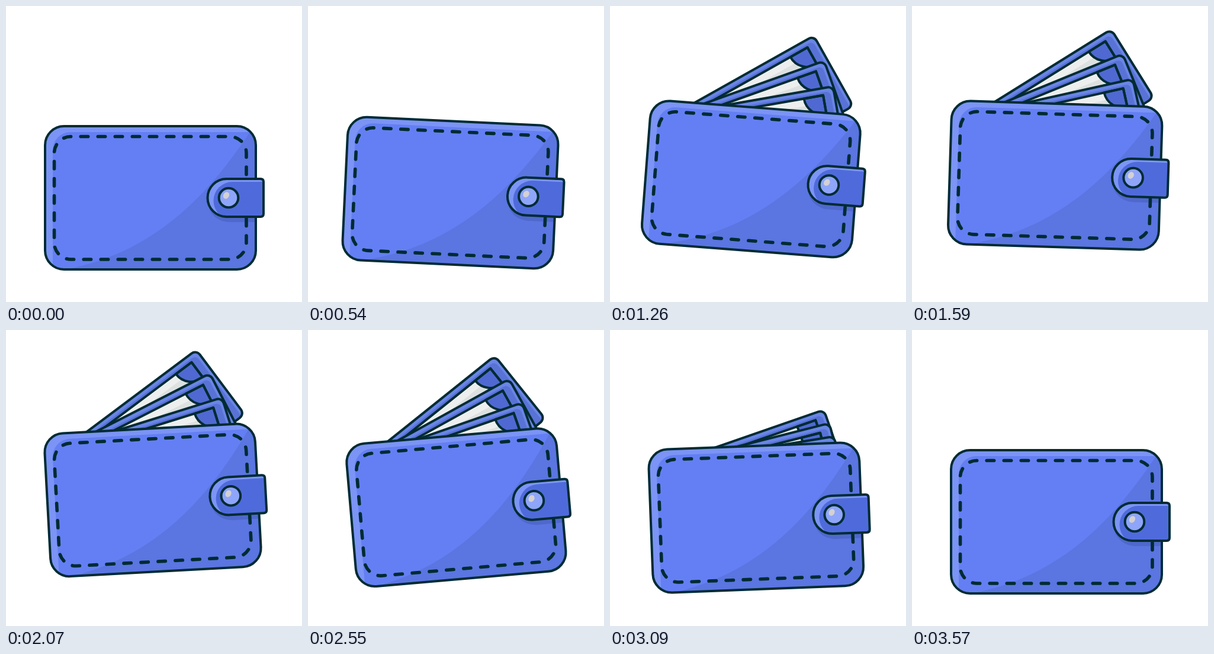
An HTML page that plays this animation: 500 by 500 pixels, repeating every 3600 ms.

```html
<!DOCTYPE html>
<html lang="en">
<head>
<meta charset="utf-8">
<title>Wallet</title>
<style>
  html, body { margin: 0; width: 100%; height: 100%; overflow: hidden; background: #fff; }
  svg { display: block; width: 100%; height: 100%; }
  .line { stroke: #002b33; stroke-width: 4; stroke-linejoin: round; stroke-linecap: round; }
  .none { fill: none; }
</style>
</head>
<body>
<svg viewBox="0 0 500 500">
  <defs>
    <clipPath id="body"><rect x="66" y="203" width="356" height="242" rx="32"/></clipPath>
    <path id="flap" d="M372.5 292H430Q435 292 435 297V351Q435 356 430 356H372.5A32 32 0 0 1 372.5 292Z"/>
    <clipPath id="flapClip"><use href="#flap"/></clipPath>
    <clipPath id="note"><rect x="-129" y="-69" width="258" height="136" rx="10"/></clipPath>
    <g id="card">
      <g clip-path="url(#note)">
        <rect x="-129" y="-69" width="258" height="136" fill="#6a85e6"/>
        <rect x="-123" y="-62" width="246" height="140" rx="8" fill="#5972d6"/>
      </g>
      <rect x="-110" y="-57" width="220" height="112" fill="#edefee"/>
      <rect x="-92" y="-44" width="178" height="90" fill="#dde1e0"/>
      <path class="line" d="M77 -57A33 33 0 0 0 110 -24V-57Z" fill="#5069d2"/>
      <rect class="line none" x="-110" y="-57" width="220" height="112"/>
      <rect class="line none" x="-129" y="-69" width="258" height="136" rx="10"/>
    </g>
  </defs>
  <g id="wallet">
    <use class="card" href="#card"/>
    <use class="card" href="#card"/>
    <use class="card" href="#card"/>
    <g clip-path="url(#body)">
      <rect x="66" y="203" width="356" height="242" fill="#7b94f5"/>
      <rect x="79" y="213" width="360" height="250" rx="30" fill="#647ff3"/>
      <path d="M412 213C340 322 249 416 105 444V450H430V213Z" fill="#5b75e1"/>
      <path d="M420 365H376Q353 363 344 344L372 330H430V365Z" fill="#4f68cc"/>
    </g>
    <rect class="line none" x="66" y="203" width="356" height="242" rx="32"/>
    <rect class="line none" x="81.5" y="220.5" width="324.5" height="207.5" rx="28"
      pathLength="1018.5" stroke-dasharray="12.4 16.7" stroke-dashoffset="-16.8" style="stroke-width:5.6"/>
    <g clip-path="url(#flapClip)">
      <use href="#flap" fill="#7c95f6"/>
      <use href="#flap" fill="#4f6bdb" transform="translate(10 5)"/>
    </g>
    <use class="line none" href="#flap"/>
    <circle class="line" cx="376" cy="324" r="16.3" fill="#8fa5f9"/>
    <ellipse cx="372" cy="320" rx="4.8" ry="6" fill="#d3d1d3" transform="rotate(32 372 320)"/>
  </g>
</svg>
<script>
  const LOOP = 3600;
  const wallet = document.getElementById('wallet');
  const cards = [...document.querySelectorAll('.card')];
  // final tilt and rise of each card, back to front
  const fan = [[-33.7, 93.5], [-24, 66], [-14.3, 41]];
  const tilt = [[0, 0], [1030, 5], [2490, -5], [LOOP, 0]];
  const reveal = [[0, 0], [360, 0], [1170, 1], [2770, 1], [3415, 0], [LOOP, 0]];

  const ease = u => (1 - Math.cos(Math.PI * u)) / 2;

  function at(steps, t) {
    const i = steps.findIndex(s => s[0] > t);
    const [t0, a] = steps[i - 1], [t1, b] = steps[i];
    return a + (b - a) * ease((t - t0) / (t1 - t0));
  }

  function draw(now) {
    const t = now % LOOP;
    const lift = -39 * ease(2 * t / LOOP);
    wallet.setAttribute('transform', `translate(0 ${lift}) rotate(${at(tilt, t)} 250 250)`);
    const p = at(reveal, t);
    cards.forEach((card, i) => {
      const [angle, rise] = fan[i];
      card.setAttribute('transform', `translate(262 ${297 - rise * p}) rotate(${angle * p})`);
    });
  }

  const start = performance.now();
  function frame() {
    draw(performance.now() - start);
    requestAnimationFrame(frame);
  }
  frame();
</script>
</body>
</html>
```
